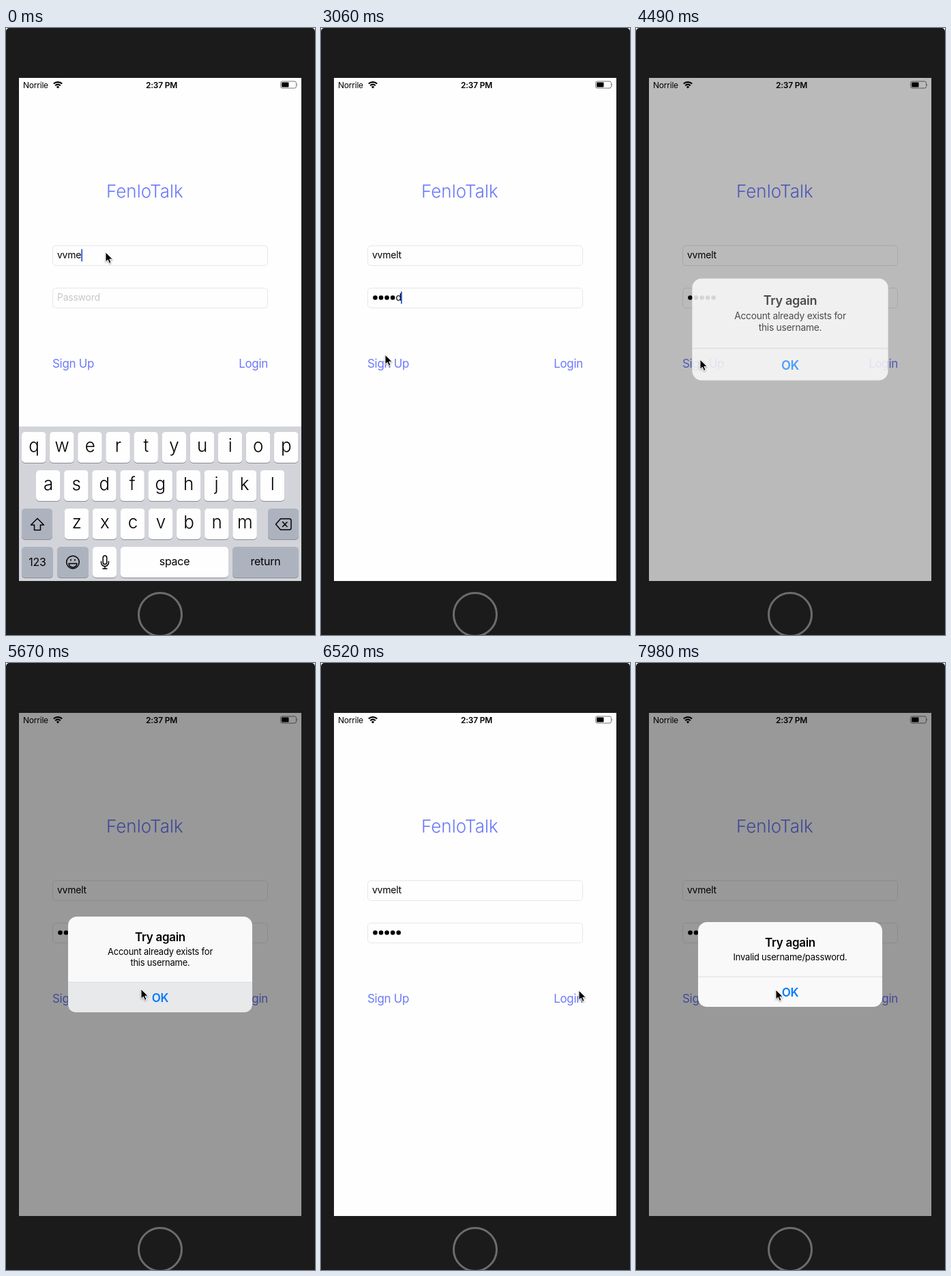
Recreate the animation shown at these times as an HTML page. Size 453 by 888 pixels, loop 8000 ms.

```html
<!DOCTYPE html>
<html lang="en">
<head>
<meta charset="utf-8">
<title>Login screen</title>
<style>
  html, body { margin: 0; width: 100%; height: 100%; overflow: hidden; background: #fff; }
  svg { display: block; width: 453px; height: 888px; }
  text { font-family: Inter, Roboto, sans-serif; letter-spacing: -.018em; white-space: pre; }
  .mid { text-anchor: middle; }
  .end { text-anchor: end; }
  .bold { font-weight: 600; }
  .light { font-weight: 300; }
  .line { fill: none; stroke: #000; stroke-width: 1.5; stroke-linejoin: round; stroke-linecap: round; }
  .field { fill: #fefefe; stroke: #e7e7e7; }
  .link { fill: #6b79fb; font-size: 17px; }
</style>
</head>
<body>
<svg viewBox="0 0 453 888">
  <defs>
    <clipPath id="screenClip"><rect x="19" y="73" width="414" height="736"/></clipPath>
  </defs>
  <rect width="453" height="920" rx="5" fill="#1b1b1b"/>
  <circle cx="226" cy="858" r="31.5" fill="none" stroke="#6c6c6c" stroke-width="3"/>
  <g clip-path="url(#screenClip)">
    <rect x="19" y="73" width="414" height="736" fill="#fefefe"/>

    <text x="25" y="88" font-size="12">Norrile</text>
    <g fill="none" stroke="#000" stroke-width="2.1">
      <path d="M69.8 81.6a9 9 0 0 1 12.4 0M72.2 84.2a5.4 5.4 0 0 1 7.6 0"/>
      <path d="M76 88.6l-2.2-2.5a3.2 3.2 0 0 1 4.4 0z" fill="#000" stroke="none"/>
    </g>
    <g id="spinner" stroke="#555" stroke-width="1.1" stroke-linecap="round"></g>
    <text class="mid bold" x="228" y="88" font-size="12">2:37 PM</text>
    <rect x="402.5" y="78" width="23" height="10" rx="2.5" fill="none" stroke="#777"/>
    <rect x="404" y="79.5" width="10.5" height="7" rx="1"/>
    <path d="M426.7 81.2q1.8 1.8 0 3.6z" fill="#777"/>

    <text class="light" x="147" y="248" font-size="26" fill="#6b79fb" style="letter-spacing:0">FenloTalk</text>
    <rect class="field" x="68.5" y="318.5" width="315" height="29" rx="4.5"/>
    <rect class="field" x="68.5" y="380.5" width="315" height="29" rx="4.5"/>
    <text id="user" x="75" y="337" font-size="14"></text>
    <text id="hint" x="75" y="399" font-size="14" fill="#c7c7cd">Password</text>
    <g id="secret"></g>
    <text id="lastChar" y="399" font-size="14"></text>
    <rect id="caret" width="2" height="18" fill="#4467d6"/>
    <text class="link" id="signUp" x="68" y="497">Sign Up</text>
    <text class="link end" id="login" x="384" y="497">Login</text>

    <g id="keyboard"></g>
    <rect id="dim" x="19" y="73" width="414" height="736"/>
    <g id="alerts"></g>
  </g>
  <path id="cursor" d="M0 0V14.2L3.3 11.2 5.6 16.4 8.1 15.3 5.8 10.2H10.4Z" stroke="#fff" stroke-width="1"
        style="filter:drop-shadow(0 1px 1px rgba(0,0,0,.35))"/>
</svg>
<script>
const LOOP = 8000;
const $ = id => document.getElementById(id);
const set = (id, attrs) => Object.entries(attrs).forEach(([k, v]) => $(id).setAttribute(k, v));

const bursts = [[0, 0, 1], [80, 80, 1], [290, 290, 1], [560, 730, 3], [910, 1500, 8], [1590, 1680, 2],
  [1770, 1850, 2], [2090, 2350, 4], [2530, 2620, 2], [2800, 3060, 4], [3150, 3330, 3], [3530, 3880, 5],
  [4030, 4490, 7], [4570, 4780, 3], [5040, 5670, 9], [5850, 6520, 8], [6610, 6610, 1],
  [6700, 7430, 9], [7520, 7980, 6]];
const updates = bursts.flatMap(([a, b, n]) =>
  Array.from({ length: n }, (_, i) => a + (b - a) * i / Math.max(1, n - 1)));
const heldTime = t => updates.findLast(u => u <= t + 1) ?? 0;

const clamp = x => Math.min(1, Math.max(0, x));
const smooth = x => (x = clamp(x), x * x * (3 - 2 * x));
// Critically damped spring going from 0 to 1.
const spring = (ms, omega = 22.85) => {
  const x = Math.max(0, ms) / 1000 * omega;
  return 1 - (1 + x) * Math.exp(-x);
};
const between = (t, a, b) => t >= a && t < b;

const cursorPath = [[0, 146, 328], [475, 146, 328], [730, 128, 402], [2715, 128, 402], [3060, 94, 478],
  [3330, 94, 485], [4950, 94, 485], [5510, 198, 477], [5800, 198, 477], [6500, 378, 479],
  [7430, 378, 479], [7980, 205, 478]];
function cursorAt(t) {
  const i = Math.max(1, cursorPath.findIndex(p => p[0] >= t));
  const [a, b] = [cursorPath[i - 1], cursorPath[i]];
  const k = smooth((t - a[0]) / (b[0] - a[0]));
  return [a[1] + (b[1] - a[1]) * k, a[2] + (b[2] - a[2]) * k];
}

function key(x, y, w, fill = '#fefefe') {
  const box = (top, color) => `<rect x="${x}" y="${top}" width="${w}" height="45" rx="5" fill="${color}"/>`;
  return box(y + 1, '#8a8d93') + box(y, fill);
}
function buildKeyboard() {
  const gray = '#adb3be';
  const letters = (row, x0, y) => [...row].map((c, i) => {
    const x = x0 + i * 41.1;
    return key(x, y, 35.5) + `<text class="mid light" x="${x + 17.8}" y="${y + 28.5}" font-size="26">${c}</text>`;
  }).join('');
  const label = (s, x, y) => `<text class="mid" x="${x}" y="${y}" font-size="16">${s}</text>`;
  return '<rect x="19" y="583" width="414" height="226" fill="#d2d4da"/>' +
    letters('qwertyuiop', 23, 591) + letters('asdfghjkl', 44, 647) + letters('zxcvbnm', 85.7, 703) +
    key(23, 703, 45, gray) + key(384, 703, 45, gray) + key(23, 759, 46, gray) + key(75, 759, 46, gray) +
    key(127, 759, 35, '#fefefe') + key(168, 759, 158) + key(332, 759, 97, gray) +
    label('123', 46, 787) + label('space', 247, 785.5) + label('return', 380.5, 785.5) +
    `<g class="line">
      <path d="M46 717.5l9.5 9.5h-5v7.500h-9v-7.500h-5z"/>
      <path d="M402.500 718h13q2.500 0 2.500 2.500v11q0 2.500-2.500 2.500h-13l-7-8zM405.500 722.500l6.500 7m0-6.500l-6.500 6.500"/>
      <circle cx="98" cy="781.500" r="9.300"/>
      <path d="M92 783.500h12a6 5.500 0 0 1-12 0zM95 777.500v1.500M101 777.500v1.500"/>
      <rect x="142.200" y="772" width="5.600" height="12.500" rx="2.800"/>
      <path d="M139.500 780.500v1.500a5.500 5.500 0 0 0 11 0v-1.500M145 787.500v3.500M142 791h6"/>
    </g>`;
}

const alerts = [
  { top: 371, lines: ['Account already exists for', 'this username.'], open: 4387, press: 5580, close: 5810 },
  { top: 379, lines: ['Invalid username/password.'], open: 7200, press: LOOP, close: LOOP }
];
function buildAlert({ top, lines }, i) {
  const bottom = 882 - top;
  return `<g id="alert${i}">
    <g id="panel${i}">
      <rect x="91" y="${top}" width="270" height="${bottom - top}" rx="13" fill="#f9f9f9"/>
      <path id="press${i}" d="M91 ${bottom - 44}h270v31q0 13-13 13h-244q-13 0-13-13z" fill="#e8e9ea"/>
      <path d="M91 ${bottom - 44}h270" stroke="#dddee0"/>
    </g>
    <g id="words${i}" class="mid">
      <text class="bold" x="226" y="${top + 36}" font-size="17">Try again</text>
      ${lines.map((s, n) => `<text x="226" y="${top + 56 + 16 * n}" font-size="13">${s}</text>`).join('')}
      <text class="bold" x="226" y="${bottom - 15}" font-size="17" fill="#007aff">OK</text>
    </g>
  </g>`;
}

$('keyboard').innerHTML = buildKeyboard();
$('alerts').innerHTML = alerts.map(buildAlert).join('');
$('spinner').innerHTML = Array.from({ length: 8 }, (_, i) =>
  `<path d="M0-2.400V-4.600" transform="rotate(${i * 45})" opacity="${(i + 2) / 9}"/>`).join('');
$('secret').innerHTML = Array.from({ length: 5 }, (_, i) =>
  `<circle cx="${79.5 + 8.55 * i}" cy="394.500" r="3.300"/>`).join('');

const typedAt = [2090, 2170, 2340, 2530, 2620];

function drawForm(t) {
  $('user').textContent = 'vvmelt'.slice(0, t < 80 ? 4 : t < 290 ? 5 : 6);

  const count = typedAt.filter(at => t >= at).length;
  const hidden = t < 3880 ? count - 1 : count;
  set('hint', { opacity: count ? 0 : 1 });
  [...$('secret').children].forEach((dot, i) => dot.setAttribute('opacity', i < hidden ? 1 : 0));
  $('lastChar').textContent = count > hidden && count ? 'hazed'[count - 1] : '';
  set('lastChar', { x: 75.2 + 8.55 * (count - 1) });

  const inUser = t < 910;
  const x = inUser ? 75 + $('user').getComputedTextLength()
    : count ? 117 - 8.55 * (5 - count) : 75;
  const blink = between(t, 1770, 1850) ? .5
    : between(t, 1850, 2090) || between(t, 3330, 3530) || t >= 4030 ? 0 : 1;
  set('caret', { x, y: inUser ? 323.5 : 385.5, opacity: blink });

  const pressed = (at, up) => t < at ? 1 : t < up ? .2 : .2 + .8 * smooth((t - up) / 230);
  set('signUp', { opacity: pressed(3530, 3650) });
  set('login', { opacity: pressed(6700, 6820) });
}

function drawAlerts(t) {
  let shade = 0;
  alerts.forEach(({ open, press, close }, i) => {
    const shown = spring(t - open);
    const level = shown * (1 - spring(t - close));
    const scale = 1.2 - .2 * shown;
    shade = Math.max(shade, level);
    set('alert' + i, { transform: `translate(226 441) scale(${scale}) translate(-226 -441)` });
    set('panel' + i, { opacity: level ** .4 * clamp(level * 50) });
    set('words' + i, { opacity: level });
    set('press' + i, { opacity: t >= press ? 1 : 0 });
  });
  set('dim', { opacity: .4 * shade });
}

function draw(time) {
  const t = heldTime(time);
  drawForm(t);
  drawAlerts(t);
  const loading = between(t, 3600, 4380) || between(t, 6780, 7200);
  set('spinner', { opacity: loading ? 1 : 0, transform: `translate(96 83.5) rotate(${Math.floor(t / 80) * 45})` });
  set('keyboard', { transform: `translate(0 ${227 * spring(t - 1130, 18)})` });
  set('cursor', { transform: `translate(${cursorAt(t)})` });
}

const start = performance.now();
function loop() {
  draw((performance.now() - start) % LOOP);
  requestAnimationFrame(loop);
}
loop();
</script>
</body>
</html>
```
